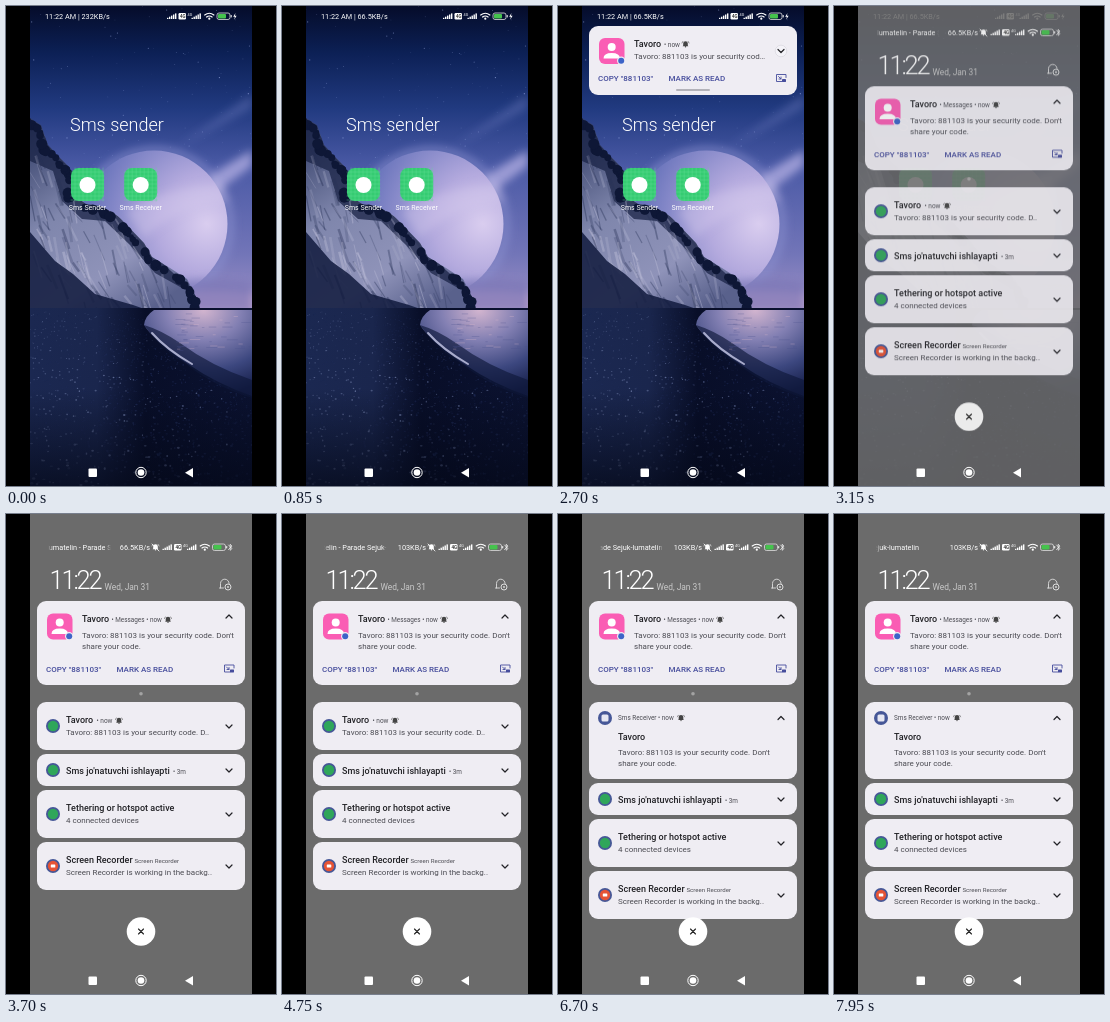
An HTML page for the animation above (8000 ms loop, 270 by 480 pixels).

```html
<!DOCTYPE html>
<html lang="en">
<head>
<meta charset="utf-8">
<title>Sms sender</title>
<style>
html, body { margin: 0; width: 100%; height: 100%; overflow: hidden; background: #000; }
svg { display: block; width: 100%; height: 100%; }
text { font-family: Roboto, "Open Sans", sans-serif; white-space: pre; }
.line { fill: none; stroke-linecap: round; stroke-linejoin: round; }
</style>
</head>
<body>
<svg id="stage" viewBox="0 0 270 480">
  <defs>
    <linearGradient id="sky" x2="0" y2="1">
      <stop offset="0" stop-color="#050c2a"/><stop offset=".15" stop-color="#0c2055"/>
      <stop offset=".33" stop-color="#213a80"/><stop offset=".52" stop-color="#4b5aa6"/>
      <stop offset=".8" stop-color="#7275b8"/><stop offset="1" stop-color="#a595c8"/>
    </linearGradient>
    <radialGradient id="moon" cx=".86" cy=".5" r=".85">
      <stop offset="0" stop-color="#d9cdef"/><stop offset=".4" stop-color="#b4aade"/>
      <stop offset="1" stop-color="#626fb8"/>
    </radialGradient>
    <linearGradient id="rock" x1=".1" x2=".7" y2="1">
      <stop offset="0" stop-color="#343f68"/><stop offset=".4" stop-color="#7f86ac"/>
      <stop offset=".75" stop-color="#8f93b9"/><stop offset="1" stop-color="#59618c"/>
    </linearGradient>
    <radialGradient id="sea" cx=".55" cy="0" r="1">
      <stop offset="0" stop-color="#d3b5cf"/><stop offset=".35" stop-color="#8380b3"/>
      <stop offset=".7" stop-color="#3c477f"/><stop offset="1" stop-color="#161f4a"/>
    </radialGradient>
    <linearGradient id="beach">
      <stop offset="0" stop-color="#1b2851"/><stop offset=".3" stop-color="#1a264d"/>
      <stop offset=".52" stop-color="#080e28"/><stop offset="1" stop-color="#0b1230"/>
    </linearGradient>
    <linearGradient id="dusk" x2="0" y2="1">
      <stop offset=".45" stop-color="#040818" stop-opacity="0"/><stop offset="1" stop-color="#040818" stop-opacity=".75"/>
    </linearGradient>
    <filter id="soft" x="-30%" y="-30%" width="160%" height="160%"><feGaussianBlur stdDeviation="4"/></filter>
    <filter id="softer"><feGaussianBlur stdDeviation=".7"/></filter>
    <linearGradient id="fade">
      <stop offset="0" stop-color="#000"/><stop offset=".08" stop-color="#fff"/>
      <stop offset=".92" stop-color="#fff"/><stop offset="1" stop-color="#000"/>
    </linearGradient>
    <mask id="carrierMask"><rect x="42" y="25" width="63" height="16" fill="url(#fade)"/></mask>
    <clipPath id="phone"><rect x="24" width="222" height="480"/></clipPath>
    <clipPath id="cliffClip"><path id="cliff" d="M24 112l11 7 7 20 10 11 12 12 2 26 14 10 15 2 17 10 26 27 8 14 18 11 17 11 12 24 1 7H24z"/></clipPath>
    <clipPath id="expandClip"><rect id="expandWindow" x="31" y="188" width="208" height="48"/></clipPath>
  </defs>
  <rect width="270" height="480"/>
  <g clip-path="url(#phone)">
    <g id="home"></g>
    <g id="headsUp"></g>
    <rect id="scrim" x="24" width="222" height="480" fill="#6b6b6b"/>
    <g id="shade"></g>
    <g id="nav" fill="#fff">
      <rect x="82.5" y="462.5" width="8.5" height="8.5" rx="1"/>
      <circle cx="135" cy="466.5" r="5.2" fill="none" stroke="#fff"/>
      <circle cx="135" cy="466.5" r="3.3"/>
      <path d="M187 462v9.5l-8-4.7z"/>
    </g>
  </g>
</svg>
<script>
const $ = id => document.getElementById(id);
const BRAND = 'Tavoro', INK = '#222226', SOFT = '#4c4c53', BLUE = '#464d9c', CARD = '#efedf3';
const CARRIER = 'lumatelin - Parade Sejuk-lumatelin';
const LOOP = 8000;

const text = (x, y, value, size, fill = '#fff', attrs = '') =>
  `<text x="${x}" y="${y}" font-size="${size}" fill="${fill}" ${attrs}>${value}</text>`;
const bold = 'font-weight="500"';
const rect = (x, y, w, h, rx, fill) =>
  `<rect x="${x}" y="${y}" width="${w}" height="${h}" rx="${rx}" fill="${fill}"/>`;
const dot = (x, y, r, fill) => `<circle cx="${x}" cy="${y}" r="${r}" fill="${fill}"/>`;
const line = (d, color, width = 1) => `<path class="line" d="${d}" stroke="${color}" stroke-width="${width}"/>`;
const shape = (d, fill, opacity = 1) => `<path d="${d}" fill="${fill}" opacity="${opacity}"/>`;
const at = (x, y, content) => `<g transform="translate(${x} ${y})">${content}</g>`;
const card = (y, h) => rect(31, y, 208, h, 9, CARD);

let seed = 11;
const random = () => (seed = seed * 16807 % 2147483647) / 2147483647;
const repeat = (count, make) => Array.from({ length: count }, make).join('');

// ---------- Small icons ----------
const bars = x => [0, 1, 2, 3, 4].map(i => rect(x + i * 2, 11.8 - i * 1.1, 1.4, 1.2 + i * 1.1, 0, '#fff')).join('');
const statusIcons = () => bars(161) + rect(172.5, 7, 7.5, 6.5, 1.2, '#fff') +
  text(174, 12.2, '4G', 4.5, '#222', bold) + bars(185.5) + text(181.5, 10, '4G', 3.8) +
  line('M198.7 9q4.6-3.5 9.2 0M200.5 11q2.8-2 5.6 0', '#fff', 1.2) + dot(203.3, 12.7, 1.1, '#fff') +
  '<rect x="211" y="7" width="13" height="6.5" rx="2" fill="none" stroke="#ddd" stroke-width=".8"/>' +
  rect(212, 8, 8, 4.5, 1, '#45c34d') + rect(224.7, 9, 1, 2.5, .4, '#fff');
const bolt = shape('M229.5 7l-2.3 3.8h1.7l-.7 2.9 2.4-3.9h-1.700z', '#fff');
const bluetooth = line('M222.5 31l3.5 3.5-1.8 1.8v-6l1.8 1.8-3.5 3.5', '#fff', .7);
const bell = (x, y, color = '#444') => at(x, y,
  shape('M-2.3 1.5v-2a2.3 2.3 0 0 1 4.6 0v2l.6.8h-5.8z', color) +
  dot(0, 2.8, .7, color) + line('M-3.5-1l.8-1.5M3.5-1l-.8-1.5', color, .6));
const chevron = (x, y, up) => at(x, y,
  line(up ? 'M-3 1.5l3-3 3 3' : 'M-3-1.5l3 3 3-3', INK, 1.2));
const popOut = y => at(223, y, line('M1 3.5h-5.5v-7h9.5v3M-2.5-1.5l2.5 2.5M0-1v2h-2', BLUE, .9) +
  rect(1, 1, 4, 3, .4, BLUE));
const avatar = y => rect(41, y, 25.5, 26, 6, '#fa5db4') + dot(53.7, y + 9, 4, '#fff') +
  shape(`M45.5 ${y + 20.5}q0-5.5 8.2-5.5t8.2 5.5z`, '#fff') +
  dot(63.2, y + 22.7, 4.2, CARD) + dot(63.2, y + 22.7, 3, '#3d64c8');
const badge = (y, color) => dot(47, y, 7, '#465797') + dot(47, y, 5.2, color);
const GREEN = '#2fa65a';

// ---------- Home screen ----------
const star = () =>
  `<circle cx="${24 + random() * 222}" cy="${random() * 165}" r="${.2 + random() * .4}" fill="#b9c8ff" opacity="${.15 + random() * .5}"/>`;

function crack() {
  const x = 24 + random() * 165, y = 125 + (x - 24) * .9 + random() * 130;
  const tone = random() < .5 ? '#c0c1da' : '#273156';
  return `<path d="M${x} ${y}l${3 + random() * 8} ${8 + random() * 20}" stroke="${tone}" stroke-width="${.8 + random() * 2}" opacity="${.15 + random() * .3}"/>`;
}

function pebble() {
  const y = 306 + random() * 174, depth = (y - 300) / 180, across = random();
  const shore = y < 325 ? 137 : Math.min(246, 140 + (y - 325) * 1.5);
  const light = random() < .55 * (1 - across);
  return `<ellipse cx="${24 + across * (shore - 24)}" cy="${y}" rx="${.5 + depth * 1.3 * random()}" ry="${.4 + depth * random()}" fill="${light ? '#7482ae' : '#202c58'}" opacity="${.2 + random() * .55}"/>`;
}

const ripple = () =>
  `<path d="M${168 + random() * 76} ${307 + random() * 38}h${2 + random() * 9}" stroke="${random() < .4 ? '#e8c0cd' : '#48508c'}" stroke-width=".6" opacity=".45"/>`;

const bush = () => {
  const p = $('cliff').getPointAtLength(random() * 285);
  return dot(p.x - 1 - random() * 4, p.y + 2 + random() * 3, 2 + random() * 3.5, '#0e1736');
};

const wallpaper = () => rect(24, 0, 222, 310, 0, 'url(#sky)') + repeat(120, star) +
  `<g filter="url(#soft)">
    <circle cx="149" cy="219" r="75" fill="none" stroke="#8e93d2" stroke-width="7" opacity=".65"/>
    ${shape('M200 172L246 144V160L205 190z', '#b0ace0', .8)}
    ${shape('M170 142L246 88V102z', '#7f8bcb', .35)}
    ${shape('M110 296Q180 280 250 288V306H110z', '#c6a5cd', .8)}
  </g>
  <circle cx="148" cy="218" r="73.500" fill="url(#moon)" filter="url(#softer)"/>
  <g filter="url(#soft)">
    ${shape('M120 205Q165 180 216 178L222 196Q175 198 138 232z', '#d8cbee', .4)}
    ${shape('M110 304Q150 265 246 276V306z', '#7974b4', .65)}
  </g>
  <g filter="url(#softer)">
    <use href="#cliff" fill="url(#rock)"/>
    <g clip-path="url(#cliffClip)">
      ${shape('M24 112l40 50 2 30 35 10 40 30 10 20 43 40-45-25-25-28-25-24-23-2-20-18-9-30-23-10z', '#1a2346', .75)}
      ${repeat(170, crack)}
      ${shape('M24 226l25 29 18 13 22 20 38 11 20 7H24z', '#111b3e', .85)}
    </g>
    ${repeat(75, bush)}
    ${rect(24, 302, 222, 178, 0, 'url(#beach)') + repeat(1500, pebble)}
    ${shape('M148 304H246V390Q211 378 182 358 148 335 138 319q1-9 10-15z', 'url(#sea)')}
    ${shape('M138 319Q155 324 174 337 205 360 246 374V392Q207 380 180 358 154 343 138 319z', '#0e1739', .65)}
    ${line('M146 327Q160 343 186 358', '#a9accc', 2)}
    ${repeat(45, ripple)}
  </g>` + rect(24, 302, 222, 178, 0, 'url(#dusk)');

function appIcon(x, label) {
  let grid = '';
  for (let i = 4; i < 33; i += 4) grid += `M${x - 16.5 + i} 162v33M${x - 16.5} ${162 + i}h33`;
  return rect(x - 16.5, 162, 33, 33, 8, '#35cc72') + line(grid, '#62dc92', .4) +
    dot(x, 179, 8, '#fff') + text(x, 204.3, label, 7, '#fff', 'text-anchor="middle"');
}

$('home').innerHTML = wallpaper() +
  text(39, 12.8, '', 7.3, '#fff', 'id="homeStatus"') + statusIcons() + bolt +
  text(64, 125, 'Sms sender', 18, '#fff', 'font-weight="300"') +
  appIcon(81.5, 'Sms Sender') + appIcon(134.7, 'Sms Receiver');

// ---------- Heads-up notification ----------
const actions = y => text(40, y, 'COPY "881103"', 8, BLUE, bold) +
  text(110.5, y, 'MARK AS READ', 8, BLUE, bold) + popOut(y - 3);
const message = `${BRAND}: 881103 is your security `;

$('headsUp').innerHTML = card(20, 69) + avatar(32) +
  text(76, 41, BRAND, 9, INK, bold) + text(106, 41, '• now', 6.5, SOFT) + bell(127.5, 38) +
  text(76, 53.3, message + 'cod…', 8, SOFT) +
  '<circle cx="223" cy="45" r="5.8" fill="#f4f3f8" stroke="#d9d7df" stroke-width=".7"/>' + chevron(223, 45) +
  actions(75) + rect(118, 83, 34, 2, 1, '#b3b2b9');

// ---------- Notification shade ----------
const twoLines = (x, y) => text(x, y, message + 'code. Don\'t', 8, SOFT) + text(x, y + 11, 'share your code.', 8, SOFT);

$('shade').innerHTML =
  `<g mask="url(#carrierMask)">${text(43, 36, CARRIER, 7.3, '#fff', 'id="carrier"')}</g>` +
  text(144, 36, '', 7.3, '#fff', 'id="shadeSpeed" text-anchor="end"') +
  bell(149.5, 33, '#fff') + line('M146 30l7 7', '#fff', .8) + at(-4.5, 23, statusIcons()) + bluetooth +
  text(43.5, 75, '11:22', 25.5, '#fff', 'font-weight="300" letter-spacing="-2.2"') +
  text(98.5, 75.5, 'Wed, Jan 31', 8.4, '#c9c9c9') +
  line('M213.5 74h4M214.5 74v-4.5a4.3 4.3 0 0 1 8.6 0', '#ddd', .9) +
  '<circle cx="222" cy="73" r="3" fill="none" stroke="#ddd"/>' + dot(222, 73, .9, '#ddd') +
  card(87, 84) + avatar(99.5) + text(76, 108, BRAND, 9, INK, bold) +
  text(105.5, 108, '• Messages • now', 6.4, SOFT) + bell(162, 105.5) + chevron(223, 102.5, true) +
  twoLines(76, 124) + actions(157.5) + dot(135, 179.8, 1.8, '#a3a3a3') +
  `<rect id="expandCard" x="31" y="188" width="208" height="48" rx="9" fill="${CARD}"/>
  <g clip-path="url(#expandClip)">
    <g id="collapsed">${badge(212, GREEN) + text(60, 209, BRAND, 9, INK, bold) +
      text(90.5, 209, '• now', 6.5, SOFT) + bell(113, 206.5) +
      text(60, 221, message + 'code. D..', 8, SOFT) + chevron(223, 212.5)}</g>
    <g id="expanded">${dot(47, 204, 7, '#465797') + rect(43.5, 200.5, 7, 7, 1.5, '#e6e7f2') +
      text(60, 206.3, 'Sms Receiver • now', 6.4, SOFT) + bell(123, 203.8) + chevron(223, 204, true) +
      text(60, 226, BRAND, 9, INK, bold) + twoLines(60, 241)}</g>
  </g>
  <g id="lower">${
    card(240, 32) + badge(256, GREEN) + text(60, 259.5, "Sms jo'natuvchi ishlayapti", 9, INK, bold) +
    text(167, 259.5, '• 3m', 6.4, SOFT) + chevron(223, 256.5) +
    card(276, 48) + badge(300, GREEN) + text(60, 297, 'Tethering or hotspot active', 9, INK, bold) +
    text(60, 309, '4 connected devices', 8, SOFT) + chevron(223, 300.5) +
    card(328, 48) + badge(352, '#e65335') + rect(44.8, 350.5, 4.5, 3, .6, '#fff') +
    text(60, 349, 'Screen Recorder', 9, INK, bold) + text(128.5, 349, 'Screen Recorder', 6.1, SOFT) +
    text(60, 361, 'Screen Recorder is working in the backg..', 8, SOFT) + chevron(223, 352.5)}</g>` +
  dot(135, 417.5, 14.3, '#fff') + line('M132.5 415l5 5M137.5 415l-5 5', '#222', 1.1);

// ---------- Timeline ----------
const progress = (t, start, duration) => {
  const p = Math.min(1, Math.max(0, (t - start) / duration));
  return 1 - (1 - p) ** 3;
};
const set = (id, attrs) => { for (const key in attrs) $(id).setAttribute(key, attrs[key]); };

function draw(now) {
  const t = now % LOOP;
  const speed = t < 450 ? '232KB/s' : t < 4450 ? '66.5KB/s' : '103KB/s';
  $('homeStatus').textContent = '11:22 AM | ' + speed;
  $('shadeSpeed').textContent = speed;

  const arrive = progress(t, 1200, 400);
  const open = progress(t, 2900, 500);
  const expand = progress(t, 5150, 320);

  set('home', { visibility: open < 1 ? 'visible' : 'hidden' });
  set('headsUp', {
    transform: `translate(0 ${(arrive - 1) * 95 + open * 67})`,
    opacity: arrive * Math.max(0, 1 - open * 1.6)
  });
  set('scrim', { opacity: open });
  set('shade', { transform: `translate(0 ${(open - 1) * 55})`, opacity: open });
  set('carrier', { x: 43 - Math.max(0, t - 3570) * .0155 });
  set('expandCard', { height: 48 + 29 * expand });
  set('expandWindow', { height: 48 + 29 * expand });
  set('collapsed', { opacity: 1 - expand });
  set('expanded', { opacity: expand });
  set('lower', { transform: `translate(0 ${29 * expand})` });
}

const began = performance.now();
function tick() {
  draw(performance.now() - began);
  requestAnimationFrame(tick);
}
tick();
</script>
</body>
</html>
```
